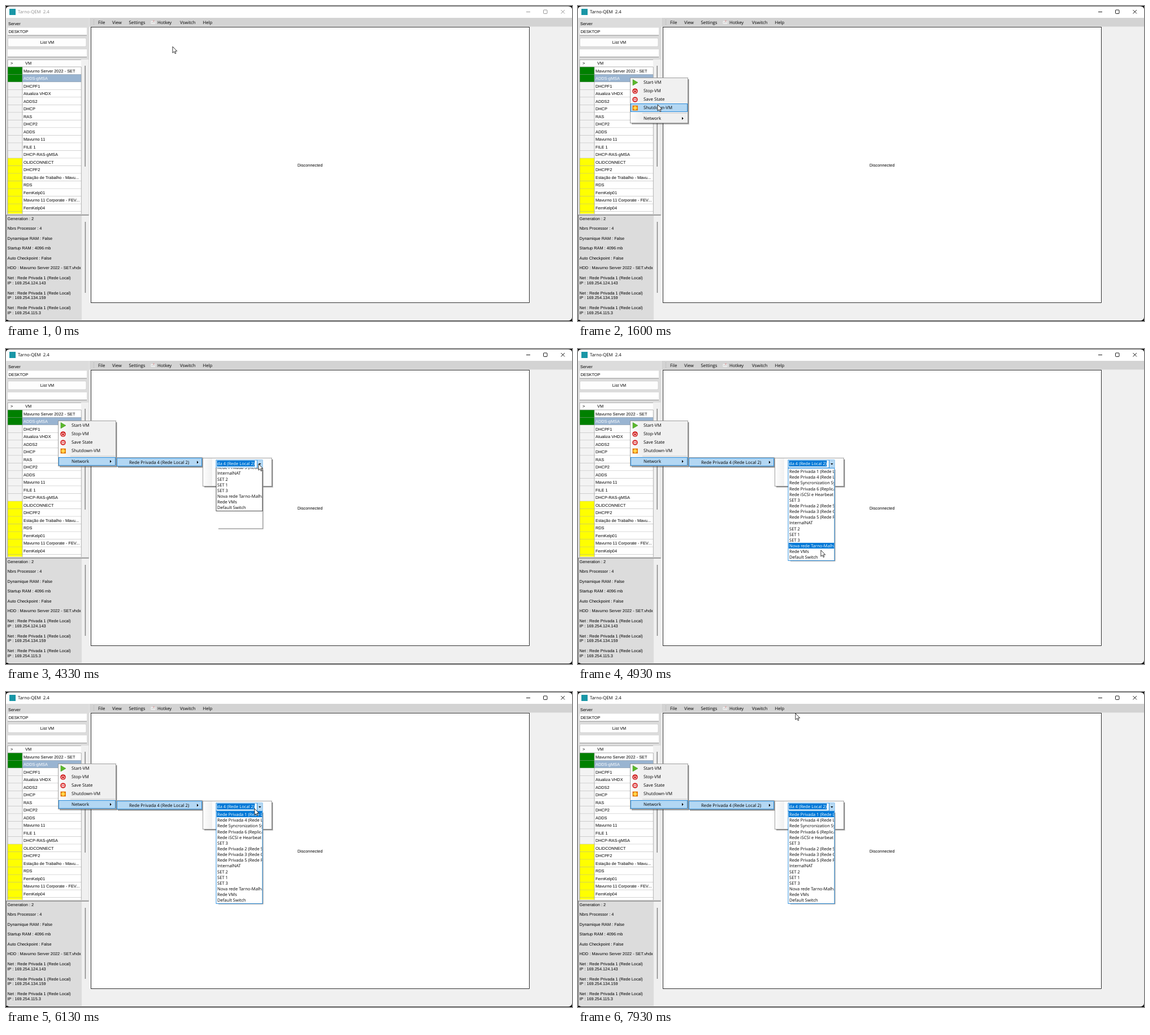
Animation of 1002 by 559 pixels, one loop 8000 ms. Source, as an HTML page:

```html
<!DOCTYPE html>
<html lang="en">
<head>
<meta charset="utf-8">
<title>VM manager</title>
<style>
html, body { margin: 0; width: 100%; height: 100%; overflow: hidden; background: #000; }
svg { display: block; width: 1002px; height: 559px; }
text { white-space: pre; text-rendering: geometricPrecision; font: 7.35px "Liberation Sans", Arial, sans-serif; fill: #000; }
text.ui { font: 7.8px "Open Sans", "Noto Sans", sans-serif; }
text.list { font: 7.6px "Open Sans", "Noto Sans", sans-serif; }
text.white { fill: #fff; }
</style>
</head>
<body>
<svg id="stage" viewBox="0 0 1002 559" xmlns="http://www.w3.org/2000/svg"></svg>
<script>
const BLUE = '#0078d7', PALE = '#b3d7f3';
const LOOP = 8000, STEP = 1000 / 15;

const rect = (x, y, w, h, fill, more = '') =>
  `<rect x="${x}" y="${y}" width="${w}" height="${h}" fill="${fill}" ${more}/>`;
const frame = (x, y, w, h, fill, stroke, more = '') =>
  rect(x + .5, y + .5, w - 1, h - 1, fill, `stroke="${stroke}" stroke-width=".8" ${more}`);
const path = (d, fill, more = '') => `<path d="${d}" fill="${fill}" ${more}/>`;
// y is the middle of the capitals
const text = (x, y, s, cls = '', more = '') =>
  `<text x="${x}" y="${y + 2.7}" class="${cls}" ${more}>${s}</text>`;
const group = (id, body, more = '') => `<g id="${id}" ${more}>${body}</g>`;
const arrow = (x, y) => path(`M${x} ${y - 2.4}l2.7 2.4l-2.7 2.4z`, '#000');

const vms = ['Mavurno Server 2022 - SET', 'ADDS-gMSA', 'DHCPF1', 'Atualiza VHDX', 'ADDS2', 'DHCP',
  'RAS', 'DHCP2', 'ADDS', 'Mavurno 11', 'FILE 1', 'DHCP-RAS-gMSA', 'OLIDCONNECT', 'DHCPF2',
  'Estação de Trabalho - Mavu...', 'RDS', 'FernKelp01', 'Mavurno 11 Corporate - FEV...', 'FernKelp04', ''];
const details = [[377, 'Generation : 2'], [394.5, 'Nbrs Processor : 4'], [412, 'Dynamique RAM : False'],
  [429.5, 'Startup RAM : 4096 mb'], [447, 'Auto Checkpoint : False'],
  [464.5, 'HDD : Mavurno Server 2022 - SET.vhdx'],
  ...['124.143', '134.159', '115.3'].flatMap((ip, i) => [
    [482.5 + i * 26.4, 'Net : Rede Privada 1 (Rede Local)'], [491 + i * 26.4, 'IP : 169.254.' + ip]])];
const switches = ['Rede Privada 1 (Rede Local)', 'Rede Privada 4 (Rede Local 2)', 'Rede Syncronization Sync',
  'Rede Privada 6 (Replica)', 'Rede iSCSI e Hearbeat', 'SET 3', 'Rede Privada 2 (Rede SET)',
  'Rede Privada 3 (Rede Core)', 'Rede Privada 5 (Rede RAS)', 'InternalNAT', 'SET 2', 'SET 1', 'SET 3',
  'Nova rede Tarno-Malha', 'Rede VMs', 'Default Switch'];

function windowFrame() {
  return rect(0, 0, 1002, 559, '#000') + rect(0, .7, 1002, 557.6, '#f0f0f0', 'rx="6"') +
    path('M0 21V7Q0 .7 6 .7H996Q1002 .7 1002 7V21z', '#fff') +
    rect(6, 5, 11, 11, '#1996a6') + text(21, 10.3, 'Tarno-QEM  2.4', 'ui', 'id="title"') +
    group('buttons',
      path('M921 10.5h7M982.5 7l6.5 6.5m0-6.5l-6.5 6.5', 'none') +
      rect(951.5, 7, 6.5, 6.5, 'none', 'rx="1"'), 'stroke-width=".9"');
}

function menuBar() {
  const items = [[163, 'File'], [188, 'View'], [217.5, 'Settings'], [268, 'Hotkey'], [308, 'Vswitch'], [348.5, 'Help']];
  return rect(148, 21, 854, 15.5, '#d3d3d3') +
    path('M155.5 24v10', 'none', 'stroke="#aaa" stroke-dasharray="1 1.7"') +
    rect(256.5, 26.5, 8, 5.5, '#eee', 'rx="1"') + rect(260, 25, 3, 3, '#d9b9b9') +
    path('M258 29.5h5', 'none', 'stroke="#aaa" stroke-dasharray="1 1"') +
    items.map(([x, s]) => text(x, 29, s, 'ui')).join('');
}

function sidePanel() {
  const field = y => rect(3, y, 140, 13.5, '#fff') + rect(3, y + 13, 140, 1, '#909090');
  const rows = vms.map((name, i) => {
    const y = 108 + i * 13.52, picked = i === 1;
    const mark = i < 2 ? '#008000' : i < 12 ? '#f3f3f3' : '#ffff00';
    return rect(3, y, 26, 13.52, mark) + rect(29, y, 104, 13.52, picked ? '#99b4d1' : '#fff') +
      path(`M3 ${y + 13.5}H133`, 'none', 'stroke="#a0a0a0" stroke-width=".8"') +
      text(31, y + 6.8, name, picked ? 'white' : '');
  }).join('');
  return rect(.5, 21, 147, 351, '#dcdcdc') +
    text(4, 31.5, 'Server') + field(38.5) + text(4.5, 45, 'DESKTOP') +
    frame(3, 56.5, 139.5, 16, '#fdfdfd', '#d0d0d0', 'rx="2"') +
    text(73, 64, 'List VM', '', 'text-anchor="middle"') + field(77) +
    rect(3, 95, 143.5, 274, '#f0f0f0') + rect(3, 95, 130, 13, '#fdfdfd') +
    text(8, 101.3, '&gt;') + text(34, 101.3, 'VM') +
    `<g clip-path="url(#grid)">${rows}</g>` +
    path('M3 95.5H133M3 108H133M29 108V369M133.3 108V369M3 95V369', 'none', 'stroke="#a0a0a0" stroke-width=".8"') +
    rect(139.4, 106, 1.5, 179, '#868686') +
    rect(1, 372, 133, 185, '#dcdcdc') + rect(134, 372, 13, 185, '#f0f0f0') +
    path('M.5 557V371H146.5', 'none', 'stroke="#696969" stroke-width="1.2"') +
    rect(139.7, 383, 1.5, 126, '#868686') +
    `<g clip-path="url(#info)">${details.map(([y, s]) => text(2.5, y, s)).join('')}</g>`;
}

const shadow = (x, y, w, h) => rect(x + 3, y + 3, w - 2, h - 2, 'rgba(0,0,0,.35)') +
  rect(x + 3, y + 3, w - 1, h - 1, 'rgba(0,0,0,.2)');
const popup = (x, y, w, h, margin, fill = '#fdfdfd') =>
  shadow(x, y, w, h) + frame(x, y, w, h, fill, '#8a8a8a') +
  rect(x + 1, y + 1.4, margin, h - 2.8, 'url(#margin)');
const hot = (x, y, w, id) => frame(x, y, w, 15, PALE, BLUE, id ? `id="${id}"` : '');

function contextMenu() {
  const icons = path('M97 130.5l9 5.2l-9 5.2z', '#5cb82c', 'stroke="#3f9420" stroke-width=".6"') +
    '<circle cx="101" cy="151" r="4.8" fill="#d01c1c"/>' +
    path('M99.3 149.2a2.7 2.7 0 1 0 3.4 0M101 148v3', 'none', 'stroke="#fff" stroke-width="1"') +
    '<circle cx="101" cy="166" r="4.8" fill="#d83030"/>' + rect(98.6, 163.8, 4.8, 4.5, '#fff') +
    rect(99.5, 165.2, 3, 1.5, '#d83030') +
    rect(96.5, 176.5, 9.5, 9, '#f08a10', 'rx="1"') + '<circle cx="101.2" cy="181" r="3" fill="#ffd84a"/>' +
    path('M97 177l2 2m4.5 4l2 2m0-8l-2 2m-4.5 4l-2 2', 'none', 'stroke="#b84a08" stroke-width=".9"');
  return popup(92, 127, 103, 81.3, 19, '#f0f0f0') + rect(114, 189.7, 79, .8, '#bdbdbd') +
    hot(93, 173, 101, 'hover') + icons +
    ['Start-VM', 'Stop-VM', 'Save State', 'Shutdown-VM'].map((s, i) => text(116, 135.7 + i * 15, s, 'ui')).join('') +
    text(116, 199.3, 'Network', 'ui') + arrow(184, 199.5);
}

const netMenu = () => popup(195, 192, 153, 17, 19) + hot(196, 193.3, 151, 'netHot') +
  text(218, 200.8, 'Rede Privada 4 (Rede Local 2)', 'ui') + arrow(338, 201);

const actionMenu = (id, h, y) => group(id, popup(348, 193, 123, h, 16) +
  text(372.5, y, 'OK', 'ui') + text(372.5, y + 15, 'Disconnect', 'ui'));

function combo() {
  return rect(372, 197, 82, 14.5, '#fff') +
    group('plain', text(374, 203.1, 'Rede Privada 4 (Rede', 'list')) +
    group('focused', frame(371.5, 196.5, 83, 15, 'none', BLUE) + rect(444.5, 197, 9.5, 14, PALE) +
      path('M444.5 197v14', 'none', `stroke="${BLUE}" stroke-width=".8"`) +
      rect(373.5, 198, 67, 10.5, BLUE) + text(374, 203.1, 'da 4 (Rede Local 2)', 'list white')) +
    path('M447.2 203h4.4l-2.2 2.4z', '#000');
}

const ROW = 10.15, TOP = 212, LISTH = 164;
function dropList() {
  const rows = switches.map((s, i) => text(374, TOP + 5.4 + i * ROW, s, 'list', 'data-row=""')).join('');
  return path('', 'none', 'id="listShadow" stroke="#a0a0a0" stroke-width="1.6"') +
    `<g clip-path="url(#drop)">` + group('slide',
      frame(371.5, 211, 83, LISTH + 1, '#fff', '#222', 'id="listBox"') +
      rect(373, TOP, 80.5, ROW, BLUE, 'id="rowHot"') + `<g clip-path="url(#rows)">${rows}</g>`) + '</g>';
}

document.getElementById('stage').innerHTML = `<defs>
  <linearGradient id="margin"><stop stop-color="#fcfcfc"/><stop offset="1" stop-color="#f0f0f0"/></linearGradient>
  <clipPath id="grid">${rect(3, 95, 131, 273.5, '#000')}</clipPath>
  <clipPath id="info">${rect(1, 372, 132.8, 185, '#000')}</clipPath>
  <clipPath id="drop">${rect(371, 211, 85, 170, '#000')}</clipPath>
  <clipPath id="rows">${rect(373, 211, 80.3, 170, '#000')}</clipPath></defs>` +
  windowFrame() + menuBar() + sidePanel() +
  frame(150, 37, 777, 490, '#fff', '#000') + text(516, 282.5, 'Disconnected') +
  group('menu', contextMenu()) + group('net', netMenu()) +
  actionMenu('short', 33, 202) + actionMenu('tall', 51, 221) +
  group('combo', combo()) + group('list', dropList()) +
  group('cursor', path('M0 0V11.2L2.6 8.8L4.3 12.6L6 11.9L4.3 8.1H7.8z', '#fff',
    'stroke="#000" stroke-width=".8" stroke-linejoin="round"'));

const el = Object.fromEntries([...document.querySelectorAll('[id]')].map(e => [e.id, e]));
const rowText = [...document.querySelectorAll('[data-row]')];
const show = (id, on) => { el[id].style.display = on ? '' : 'none'; };

// time, x, y, and 1 where the pointer arrives at constant speed
const track = [[0, 295, 72], [867, 89, 128], [933, 89, 128], [1000, 92, 127], [1333, 92, 127],
  [1600, 141, 175, 1], [1867, 140, 192], [2000, 140, 192], [2867, 250, 197], [2933, 252, 198],
  [3133, 252, 198], [3933, 447, 205], [4000, 447, 205], [4067, 450, 205], [4133, 447, 204],
  [4467, 447, 204], [4933, 430, 357], [5067, 429, 377], [5133, 429, 377], [5933, 439, 206],
  [6000, 439, 206], [6067, 440, 207], [6133, 440, 207], [6733, 430, 379], [6933, 430, 379],
  [7800, 413, 86, 1], [7867, 400, 62, 1], [7933, 385, 38, 1], [8001, 385, 38]];

function pointer(t) {
  const i = Math.max(1, track.findIndex(k => k[0] > t));
  const [t0, x0, y0] = track[i - 1], [t1, x1, y1, even] = track[i];
  const u = (t - t0) / (t1 - t0), s = even ? u : u * u * (3 - 2 * u);
  return [x0 + (x1 - x0) * s, y0 + (y1 - y0) * s];
}

function draw(time) {
  const t = Math.floor((time + 5) / STEP) * STEP + .5;
  const [x, y] = pointer(t);
  el.cursor.setAttribute('transform', `translate(${x} ${y})`);

  const active = t > 860;
  el.title.style.fill = active ? '#000' : '#8c8c8c';
  el.buttons.setAttribute('stroke', active ? '#000' : '#8c8c8c');

  show('menu', t > 995);
  const network = t > 1795;
  show('hover', network || y > 129);
  const item = Math.max(0, Math.min(3, Math.floor((y - 128) / 15)));
  el.hover.setAttribute('y', network ? 192.4 : 128.5 + item * 15);

  show('net', t > 2260);
  show('netHot', x > 196);
  show('short', t > 2795 && t < 3260);
  show('tall', t > 3260);
  show('combo', t > 3260);
  show('plain', t < 4260);
  show('focused', t > 4260);

  show('list', t > 4260);
  const open = Math.max(0, Math.min(1, (t - 4235) / 212));
  el.slide.setAttribute('transform', `translate(0 ${-(LISTH + 1) * (1 - open)})`);
  const bottom = TOP + LISTH * Math.min(1, open * 1.4);
  el.listShadow.setAttribute('d', `M454.8 214V${bottom}H376`);
  el.listBox.setAttribute('stroke', open < 1 ? '#222' : BLUE);

  // the list highlight trails the pointer by one step
  const lagY = pointer(Math.max(0, t - STEP))[1];
  const row = t > 4530 && (t > 4800 || lagY >= TOP)
    ? Math.max(0, Math.min(15, Math.floor((lagY - TOP) / ROW))) : -1;
  show('rowHot', row >= 0);
  el.rowHot.setAttribute('y', TOP + row * ROW);
  rowText.forEach((e, i) => e.classList.toggle('white', i === row));
}

const start = performance.now();
function tick() {
  draw((performance.now() - start) % LOOP);
  requestAnimationFrame(tick);
}
tick();
</script>
</body>
</html>
```
